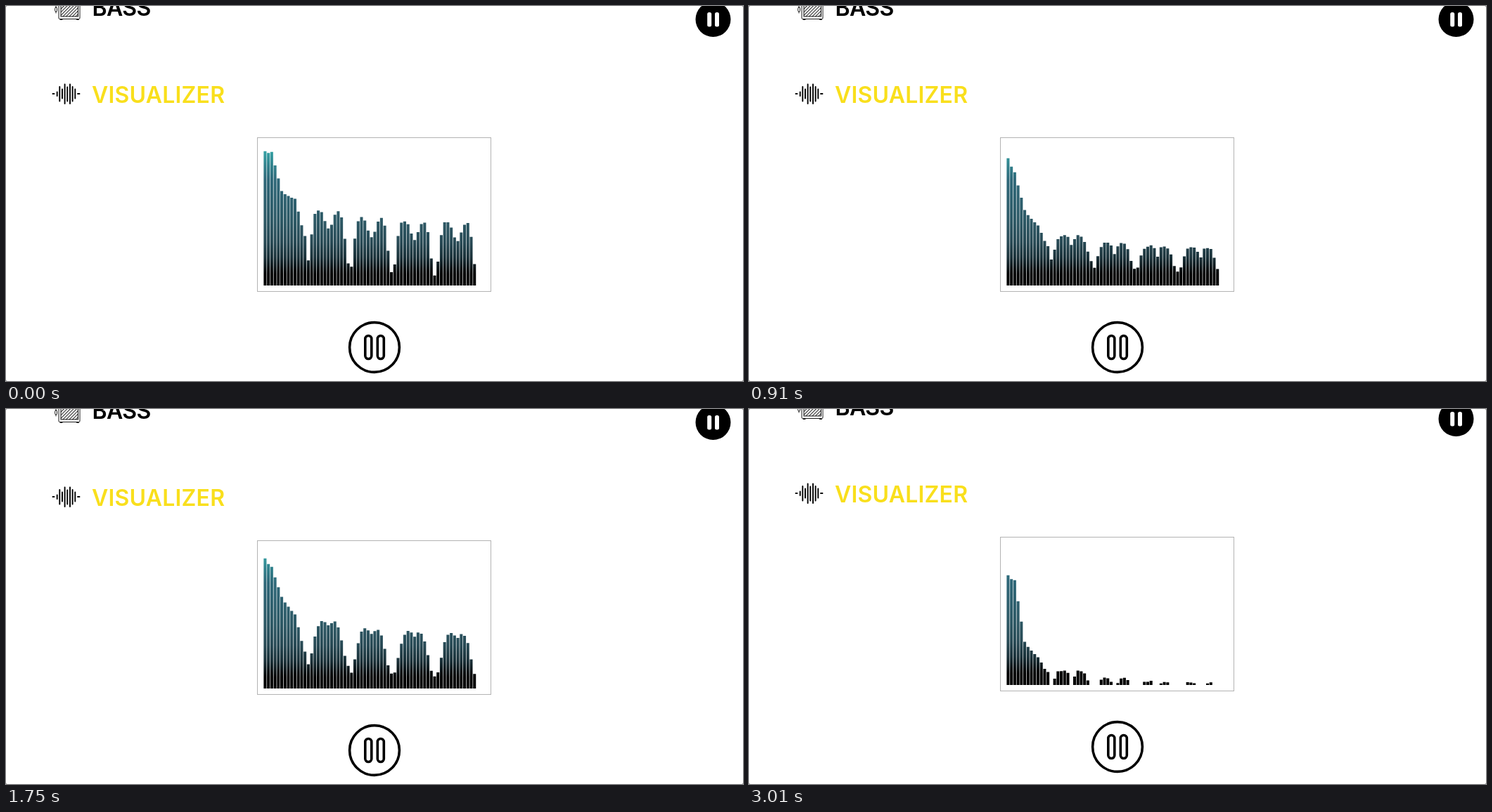
Write an HTML page that moves like this. It is 1048 by 534 pixels and loops after 3.08 s.

```html
<!DOCTYPE html>
<html lang="en">
<head>
<meta charset="utf-8">
<title>Visualizer</title>
<style>
  html, body { margin: 0; width: 100%; height: 100%; overflow: hidden; background: #fff; }
  svg { display: block; width: 100vw; height: 100vh; }
  text { font: 600 32px Inter, "Open Sans", sans-serif; }
  .line { fill: none; stroke: #000; stroke-linecap: round; }
</style>
</head>
<body>
<svg viewBox="0 0 1048 534">
  <defs>
    <!-- Runs from the bar feet up to full height -->
    <linearGradient id="tone" gradientUnits="userSpaceOnUse" x1="0" y1="398" x2="0" y2="198">
      <stop offset=".08" stop-color="#000"/>
      <stop offset=".2" stop-color="#1a3139"/>
      <stop offset=".31" stop-color="#284a55"/>
      <stop offset=".45" stop-color="#2d5864"/>
      <stop offset=".75" stop-color="#2e6778"/>
      <stop offset=".85" stop-color="#31808b"/>
      <stop offset="1" stop-color="#39b1b0"/>
    </linearGradient>
    <pattern id="hatch" width="3.2" height="3.2" patternUnits="userSpaceOnUse" patternTransform="rotate(45)">
      <path d="M.6 0V3.2" stroke="#000" stroke-width=".9"/>
    </pattern>
  </defs>

  <g id="page">
    <!-- Amplifier -->
    <g class="line" stroke-width=".9">
      <rect x="75" y="-16" width="30" height="34.5" rx="1.5"/>
      <rect x="78" y="-12" width="24.5" height="27" style="fill:url(#hatch)"/>
      <path d="M77 19.5H80M100.5 19.5H103.5M71 -4V2M71 8V10"/>
      <rect x="69.7" y="2" width="2.8" height="6" rx="1.3"/>
    </g>
    <text x="122.5" y="13.5" letter-spacing="-.6">BASS</text>

    <!-- Sound wave -->
    <path class="line" stroke-width="1.9" d="M66.5 125H68.5M102 125H104.5M72.7 122.5V128M76.3 115V135.5M80 118.5V131.5M83.6 111.5V139M87.3 115.5V135.5M91 111.5V139M94.6 115V135.5M98.3 118.5V131.5"/>
    <text x="122" y="138" fill="#f9df1c" letter-spacing=".2">VISUALIZER</text>

    <rect x="357.5" y="187.5" width="332" height="219" fill="#fff" stroke="#b3b3b3"/>
    <path id="bars" fill="url(#tone)"/>

    <!-- Pause buttons -->
    <circle cx="1005.5" cy="19" r="25"/>
    <g fill="#fff">
      <rect x="997.2" y="9" width="6" height="20.5" rx="2.5"/>
      <rect x="1008" y="9" width="6" height="20.5" rx="2.5"/>
    </g>
    <g class="line" stroke-width="3.6">
      <circle cx="524" cy="486" r="35.4"/>
      <rect x="510.8" y="469.5" width="9" height="33" rx="4.5"/>
      <rect x="528.3" y="469.5" width="9" height="33" rx="4.5"/>
    </g>
  </g>

  <!-- Rounded window corners -->
  <path fill="#8a8a8a" d="M0 0H2Q0 0 0 2ZM1048 0V2Q1048 0 1046 0ZM0 534V532Q0 534 2 534ZM1048 534H1046Q1048 534 1048 532Z"/>
</svg>

<script>
const LOOP = 3080, TICK = 70;
const COUNT = 64, LEFT = 366.4, PITCH = 4.727, WIDTH = 4.05, FLOOR = 398;
const HEAD = 13, SPAN = 12.85, SINK = 22;
const KNOTS = [0, 2, 5, 9, 12];

// head: heights at KNOTS; low and crest: the repeating lobe;
// sharp: steepness of its sides; dip: notch in its middle, wide: size of the notch
const sounds = [
  { at: 0, head: [190, 190, 134, 122, 69], low: 28, crest: 108, sharp: 12, dip: 28, wide: 2.5 },
  { at: 630, head: [181, 164, 98, 74, 34], low: 14, crest: 63, sharp: 7, dip: 5, wide: 1 },
  { at: 1190, head: [179, 158, 116, 94, 75], low: 53, crest: 80, sharp: 14, dip: 26, wide: .6 },
  { at: 1750, head: [184, 173, 130, 104, 51], low: 31, crest: 97, sharp: 5, dip: 8, wide: 1 },
  { at: 2240, head: [185, 157, 145, 128, 91], low: 66, crest: 111, sharp: 14, dip: 7, wide: 1 },
  { at: 2520, head: [155, 152, 136, 120, 67], low: 30, crest: 102, sharp: 14, dip: -6, wide: 1 },
  { at: 3010, head: [155, 149, 61, 38, 17], low: -8, crest: 20, sharp: 14, dip: 24, wide: .6 }
];

const mix = (a, b, k) => a + (b - a) * k;
const noise = n => { const v = Math.sin(n * 12.9898) * 43758.5453; return (v - Math.floor(v)) * 2 - 1; };

function headLevel(s, i) {
  const n = KNOTS.findIndex(knot => knot >= i) || 1;
  return mix(s.head[n - 1], s.head[n], (i - KNOTS[n - 1]) / (KNOTS[n] - KNOTS[n - 1]));
}

function lobeLevel(s, i) {
  const turn = Math.floor((i - HEAD) / SPAN);
  const p = i - HEAD - turn * SPAN;
  const dome = 1 - Math.abs(Math.cos(Math.PI * (p + .5) / SPAN)) ** s.sharp;
  const notch = s.dip * Math.exp(-((p - 6.2) ** 2) / s.wide);
  return mix(s.low, s.crest, dome) - notch - SINK * turn / (turn + 1);
}

function level(s, i) {
  const base = i < HEAD ? headLevel(s, i) : lobeLevel(s, i);
  return Math.max(0, base + 1.5 * noise(i + 1));
}

const page = document.getElementById("page");
const bars = document.getElementById("bars");

function draw(t) {
  const next = Math.max(1, sounds.findIndex(s => s.at >= t));
  const a = sounds[next - 1], b = sounds[next];
  const k = (t - a.at) / (b.at - a.at);
  let d = "";
  for (let i = 0; i < COUNT; i++) {
    const h = mix(level(a, i), level(b, i), k);
    if (h < 1) continue;
    const x = LEFT + i * PITCH;
    d += `M${x.toFixed(2)} ${FLOOR}v${-h.toFixed(1)}h${WIDTH}V${FLOOR}z`;
  }
  bars.setAttribute("d", d);
  const scroll = Math.min(5, Math.max(0, Math.floor((t - 2310) / 84)));
  page.setAttribute("transform", `translate(0 ${-scroll})`);
}

function frame() {
  const t = performance.now() % LOOP;
  draw(Math.floor(t / TICK) * TICK);
  requestAnimationFrame(frame);
}
frame();
</script>
</body>
</html>
```
